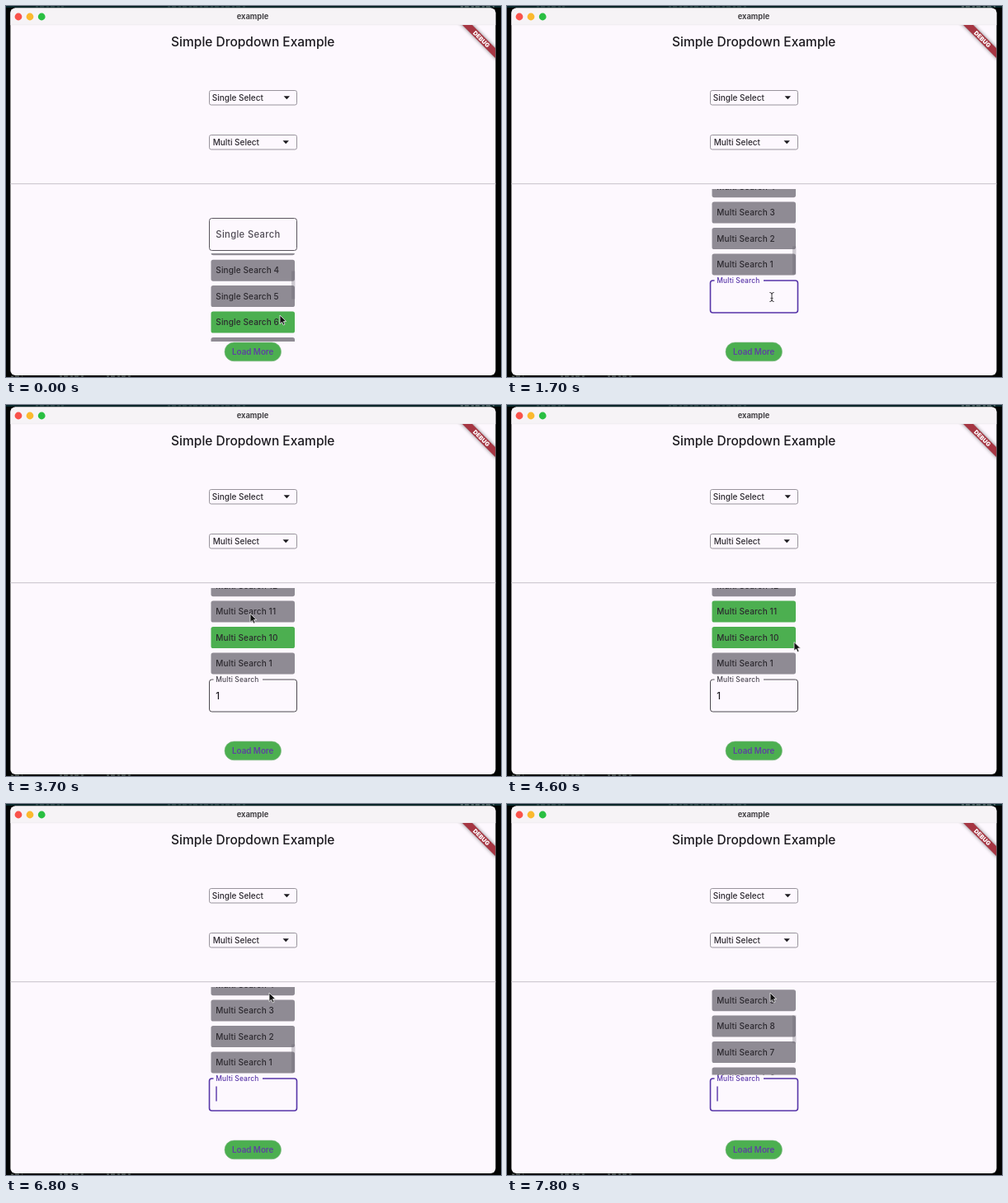
These frames come from a looping animation (600 px wide and 450 px high, 8 s). An HTML page:

```html
<!DOCTYPE html>
<html lang="en">
<head>
<meta charset="utf-8">
<title>Dropdown example</title>
<style>
html, body { margin: 0; width: 100%; height: 100%; overflow: hidden; background: #000; }
svg { display: block; width: 600px; height: 450px; }
text { font: 500 10px Inter, Roboto, sans-serif; fill: #2b282e; white-space: pre; }
.title { font-size: 15.5px; font-weight: 450; fill: #1d1b20; }
.bar { font-size: 9.3px; font-weight: 700; fill: #454347; }
.field { font-size: 11.2px; letter-spacing: .36px; fill: #4f4b54; }
.float { font-size: 8.4px; letter-spacing: .16px; }
.value { font-size: 11.4px; fill: #1d1b20; }
.item { letter-spacing: .13px; }
.button { font-size: 9.8px; font-weight: 600; fill: #5d43a0; }
.debug { font-size: 7.2px; font-weight: 900; fill: #fff; }
.mid { text-anchor: middle; }
</style>
</head>
<body>
<svg viewBox="0 0 600 450">
  <defs>
    <clipPath id="window"><rect x="5.4" y="2.4" width="588" height="445.6" rx="6"/></clipPath>
    <clipPath id="below"><rect x="246" y="300" width="108" height="107"/></clipPath>
    <clipPath id="above"><rect x="246" y="222" width="108" height="106.5"/></clipPath>
    <filter id="soft" x="-20%" y="-80%" width="140%" height="260%"><feGaussianBlur stdDeviation="2"/></filter>
  </defs>
  <rect width="600" height="450" fill="#020403"/>
  <rect width="600" height="2" fill="#06262a"/>
  <g stroke="#8b9a96" stroke-width="1.4" stroke-dasharray="3 2 5 3" opacity=".55">
    <path d="M36 .7H70M196 .7H290" opacity=".5"/><path d="M551 .7H592"/>
    <path d="M6 449.3H20M65 449.3H95M122 449.3H152"/>
  </g>
  <g clip-path="url(#window)">
    <rect width="600" height="450" fill="#fdf8fe"/>
    <rect width="600" height="23" fill="#f6f3f6"/>
    <path d="M5 22.9H594" stroke="#e6e2e7" stroke-width=".6"/>
    <path d="M5 215.7H594" stroke="#d0ccd3" stroke-width="1.3"/>
    <svg x="493.4" y="23" width="100" height="100" viewBox="-100 0 100 100">
      <g transform="rotate(45)">
        <rect x="-40" y="20" width="80" height="8.5" fill="#000" opacity=".5" filter="url(#soft)"/>
        <rect x="-40" y="20" width="80" height="8.5" fill="#a63643"/>
        <text class="debug mid" y="26.9">DEBUG</text>
      </g>
    </svg>
  </g>
  <circle cx="15" cy="13" r="4.4" fill="#f9524b"/>
  <circle cx="29" cy="13" r="4.4" fill="#fbb92e"/>
  <circle cx="43.2" cy="13" r="4.4" fill="#2abf42"/>
  <text class="bar mid" x="299" y="16">example</text>
  <text class="title mid" x="299.3" y="48.6">Simple Dropdown Example</text>
  <g fill="none" stroke="#98949c">
    <rect x="246.5" y="102.5" width="106" height="17.5" rx="2.2"/>
    <rect x="246.5" y="156.5" width="106" height="17.5" rx="2.2"/>
  </g>
  <text x="249.7" y="114.8">Single Select</text>
  <text x="250.7" y="168.8">Multi Select</text>
  <path d="M336.6 109.2h7.4l-3.7 4zM335.5 163.2h7.4l-3.7 4z" fill="#1d1b20"/>
  <g id="live"></g>
  <rect x="265" y="408" width="68.5" height="22.8" rx="11.4" fill="#4caf50" stroke="#86b98b" stroke-width=".6"/>
  <text class="button mid" x="299.2" y="423">Load More</text>
  <g id="pointer"></g>
</svg>
<script>
const LOOP = 8000, STEP = 100, PITCH = 31.4, COUNT = 15;
const PURPLE = '#5735a8', DARK = '#4d4a50', OUTLINE = '#928e96';
const live = document.getElementById('live');
const pointer = document.getElementById('pointer');

// [ms, x, y] with straight travel between stops
const pointerPath = [
  [0, 332, 375], [200, 334, 378], [400, 385, 372], [500, 388, 366], [900, 344, 347],
  [1000, 321, 353], [2600, 321, 353], [2900, 306, 314], [3300, 300, 281], [3600, 299, 278],
  [3700, 296, 253], [4300, 296, 253], [4900, 400, 322], [5000, 400, 322], [5300, 287, 353],
  [5900, 287, 353], [6500, 318, 234], [6800, 319, 229], [8000, 319, 229]
];
// [ms, offset]
const scrollPath = [[0, 0], [6800, 0], [7000, 25], [7300, 88], [7400, 88], [7800, 176], [8000, 176]];

function along(path, t) {
  const i = Math.max(1, path.findIndex(stop => stop[0] >= t));
  const [a, b] = [path[i - 1], path[i]];
  const k = (t - a[0]) / (b[0] - a[0]);
  return a.slice(1).map((v, n) => v + (b[n + 1] - v) * k);
}

const within = (t, ...spans) => spans.some(([from, to]) => t >= from && t < to);
const blinkOn = (t, start) => (t - start) % 1000 < 500;

function row(label, center, selected) {
  return `<rect x="248.5" y="${center - 13}" width="101.5" height="26" rx="2.6" fill="${selected ? '#4caf50' : '#8f8b94'}"/>
    <text class="item" x="254.3" y="${center + 3.7}">${label}</text>`;
}

function thumb(y) {
  return `<rect x="346" y="${y}" width="4.4" height="34" fill="#68636c" opacity=".32"/>`;
}

function field(y, label, { color = OUTLINE, width = 1, floating = false, value = '', caret = false }) {
  let out = `<rect x="246.5" y="${y}" width="106" height="39" rx="3" fill="none" stroke="${color}" stroke-width="${width}"/>`;
  if (!floating) return out + `<text class="field" x="254.3" y="${y + 23.8}">${label}</text>`;
  out += `<rect x="251.5" y="${y - 2}" width="59.5" height="4" fill="#fdf8fe"/>
    <text class="float" x="254.3" y="${y + 3.1}" style="fill:${color === PURPLE ? PURPLE : '#49454f'}">${label}</text>
    <text class="value" x="254.3" y="${y + 24.4}">${value}</text>`;
  if (caret) out += `<rect x="${value ? 259.2 : 254.3}" y="${y + 9.5}" width="1.4" height="18" fill="${PURPLE}"/>`;
  return out;
}

function singleList() {
  const scroll = 89.5;
  let out = '';
  for (let n = 1; n <= COUNT; n++) {
    const center = 316 + (n - 1) * PITCH - scroll;
    if (center > 280 && center < 425) out += row('Single Search ' + n, center, n === 6);
  }
  return `<g clip-path="url(#below)">${out}${thumb(300 + scroll * .24)}</g>`;
}

function multiList(t, query) {
  const [scroll] = along(scrollPath, t);
  const picked = [t >= 3600 && 10, t >= 3900 && 11];
  let out = '', slot = 0;
  for (let n = 1; n <= COUNT; n++) {
    if (!String(n).startsWith(query)) continue;
    const center = 313.4 - slot++ * PITCH + scroll;
    if (center > 205 && center < 345) out += row('Multi Search ' + n, center, picked.includes(n));
  }
  const bar = query ? '' : thumb(291.5 - scroll * .2);
  return `<g clip-path="url(#above)">${out}${bar}</g>`;
}

function drawPointer(t) {
  if (within(t, [2000, 2700])) return '';
  const [x, y] = along(pointerPath, t);
  const overField = x > 246 && x < 353 && y > 333 && y < 372 && t > 600;
  const shape = overField
    ? '<path d="M-2.6-5.5Q0-5.5 0-3.6Q0-5.5 2.6-5.5M0-4V4M-2.6 5.5Q0 5.5 0 3.6Q0 5.5 2.6 5.5M-1.5 1.4H1.5" fill="none" stroke="#3a383c"/>'
    : '<path d="M0 0V10.6L2.5 8.4L4.2 12L6 11.2L4.4 7.6H7.7Z" fill="#111" stroke="#eee" stroke-width=".8"/>';
  return `<g transform="translate(${x} ${y})">${shape}</g>`;
}

function draw(t) {
  const singleOpen = t < 500;
  const multiOpen = within(t, [1200, 4900], [5600, LOOP]);
  const focused = within(t, [1200, 3600], [5600, LOOP]);
  const hovered = within(t, [800, 1200], [5200, 5600]);
  const query = within(t, [2000, 5700]) ? '1' : '';
  const blinkStart = t >= 5700 ? 5700 : t >= 5500 ? 5500 : t >= 2000 ? 2000 : 1200;
  const caret = (focused || within(t, [5500, 5600])) && blinkOn(t, blinkStart);

  let out = '';
  if (!multiOpen) out += field(257.5, 'Single Search', { color: singleOpen ? '#59555d' : OUTLINE });
  if (singleOpen) out += singleList();
  else out += field(333, 'Multi Search', {
    color: focused ? PURPLE : hovered || query ? DARK : OUTLINE,
    width: focused ? 1.6 : 1,
    floating: focused || query !== '',
    value: query,
    caret
  });
  if (multiOpen) out = multiList(t, query) + out;
  live.innerHTML = out;
  pointer.innerHTML = drawPointer(t);
}

let shown = -1;
function tick() {
  const t = Math.floor(performance.now() % LOOP / STEP) * STEP;
  if (t !== shown) draw(shown = t);
  requestAnimationFrame(tick);
}
tick();
</script>
</body>
</html>
```
